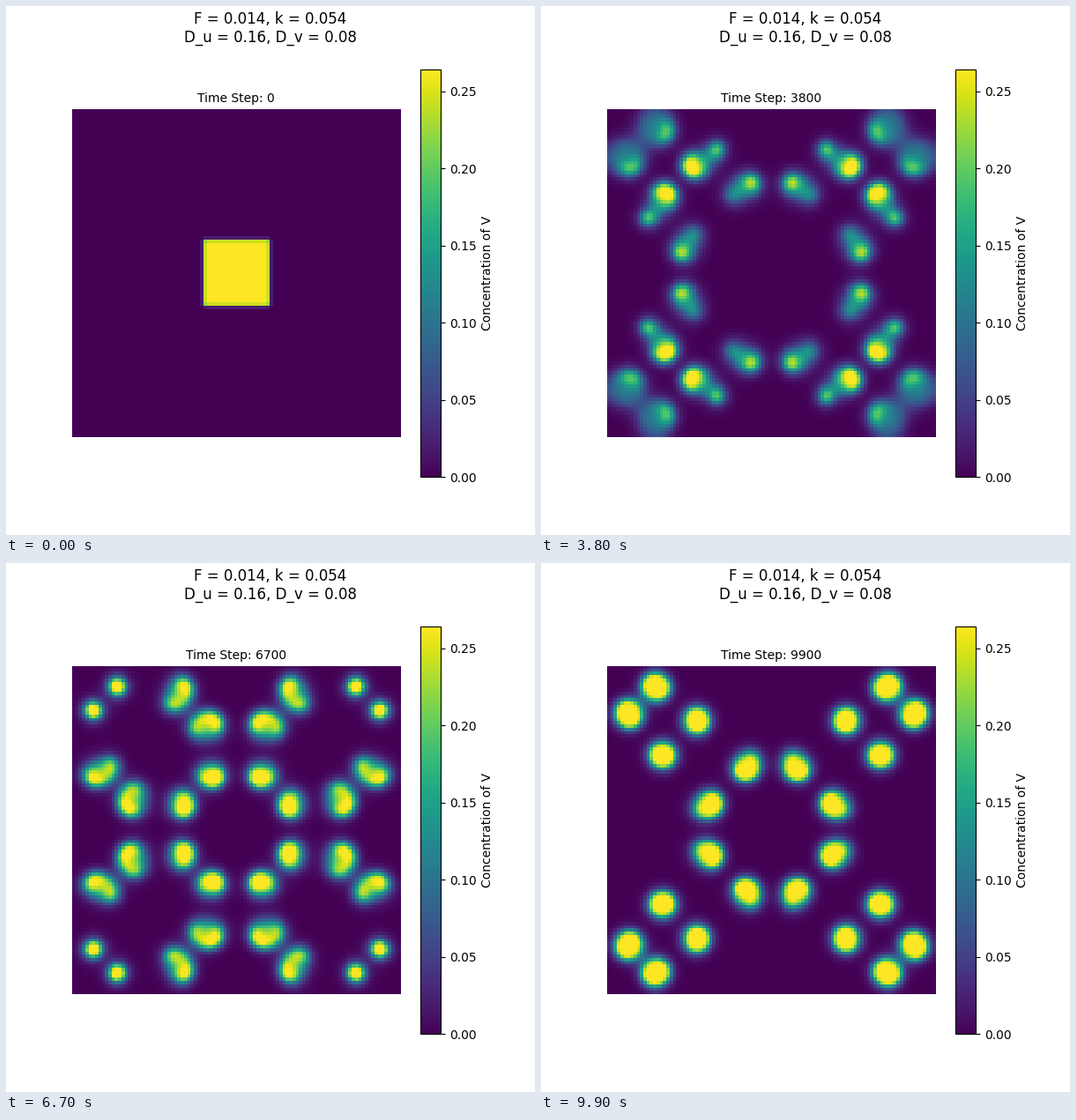
A matplotlib script that plays this animation: 600x600 px, repeating every 10000 ms.

```python
import numpy as np
import matplotlib.pyplot as plt
from matplotlib.animation import FuncAnimation

# Gray-Scott reaction-diffusion on a periodic grid
N, HALF = 100, 10
F, K = 0.014, 0.054
DU, DV = 0.16, 0.08
FRAMES, STRIDE, INTERVAL = 100, 100, 100


def laplacian(a):
    vert = np.roll(a, 1, 0) + np.roll(a, -1, 0)
    horiz = np.roll(a, 1, 1) + np.roll(a, -1, 1)
    return (vert + horiz) - 4 * a


def simulate():
    u, v = np.ones((N, N)), np.zeros((N, N))
    seed = slice(N // 2 - HALF, N // 2 + HALF)
    u[seed, seed] = 0.5
    v[seed, seed] = 0.25
    shots = []
    for step in range((FRAMES - 1) * STRIDE + 1):
        uvv = u * v * v
        du = DU * laplacian(u) - uvv + F * (1 - u)
        dv = DV * laplacian(v) + uvv - (F + K) * v
        u += du
        v += dv
        if step % STRIDE == 0:
            shots.append(v.copy())
    return shots


shots = simulate()

plt.rcParams["font.family"] = "DejaVu Sans"
fig, ax = plt.subplots(figsize=(6, 6), dpi=100)
fig.suptitle(f"F = {F}, k = {K}\nD_u = {DU}, D_v = {DV}", fontsize=12, y=0.99)
image = ax.imshow(shots[0], cmap="viridis", vmin=0, vmax=shots[0].max())
fig.colorbar(image, ax=ax, label="Concentration of V")
title = ax.set_title("Time Step: 0", fontsize=10)
ax.axis("off")


def update(i):
    image.set_data(shots[i])
    title.set_text(f"Time Step: {i * STRIDE}")
    return image, title


anim = FuncAnimation(fig, update, frames=FRAMES, interval=INTERVAL,
                     repeat=True, repeat_delay=0)
plt.show()
```
